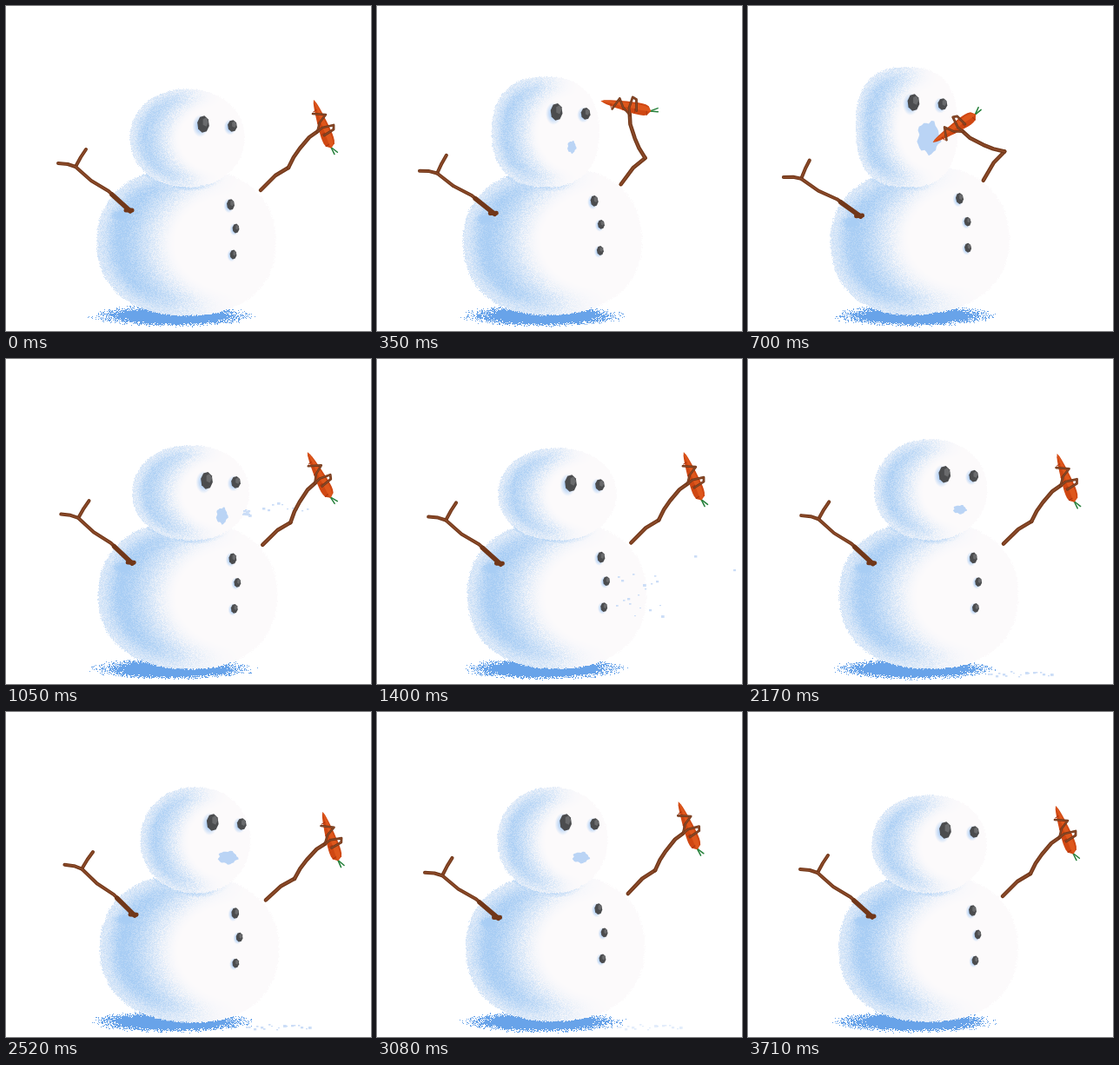
These frames come from a looping animation (420 by 374 pixels, 3.78 s). An HTML page with a canvas:

```html
<!DOCTYPE html>
<html lang="en">
<head>
<meta charset="utf-8">
<title>Snowman</title>
<style>
  html, body { margin: 0; width: 100%; height: 100%; overflow: hidden; background: #fff; }
  canvas { display: block; }
</style>
</head>
<body>
<canvas id="stage" width="420" height="374"></canvas>
<script>
const W = 420, H = 374, LOOP = 3780, STEP = 70;
const ctx = document.getElementById('stage').getContext('2d');
const image = ctx.createImageData(W, H);
const PIVOT = { x: 190, y: 355 };
const BODY = { x: 207, y: 271, rx: 103, ry: 85, n: 2.25 };
const NECK = 208, SNEEZE = 1000;

const clamp = v => Math.max(0, Math.min(1, v));
const smooth = (a, b, v) => { const k = clamp((v - a) / (b - a)); return k * k * (3 - 2 * k); };
// Eases up from a to b, holds, eases down from c to d
const pulse = (t, a, b, c, d) => smooth(a, b, t) * (1 - smooth(c, d, t));

function hash(x, y, seed) {
  let h = Math.imul(x + 101, 374761393) ^ Math.imul(y + 57, 668265263) ^ Math.imul(seed + 13, 2147477817);
  h = Math.imul(h ^ (h >>> 13), 1274126177);
  h = Math.imul(h ^ (h >>> 15), 2246822519);
  return ((h ^ (h >>> 16)) >>> 0) / 4294967296;
}

function poseAt(t) {
  const tickle = pulse(t, 100, 560, 910, 1080);
  const lean = -0.115 * tickle
    + 0.038 * pulse(t, 950, 1100, 1190, 1400)
    - 0.085 * pulse(t, 1360, 1640, 1650, 2120)
    + 0.042 * pulse(t, 2050, 2520, 2530, 2950)
    - 0.029 * pulse(t, 2750, 3080, 3360, 3710);
  const stretch = 25 * tickle
    - 7 * pulse(t, 960, 1080, 1400, 1560)
    + 20 * pulse(t, 1400, 1610, 1640, 1800)
    - 12 * pulse(t, 1640, 1820, 1830, 2200)
    + 9 * pulse(t, 2000, 2400, 3220, 3650);
  const gasp = pulse(t, 200, 560, 950, 1150), talk = pulse(t, 1600, 2520, 2900, 3650);
  const height = 113 + stretch;
  return {
    lean, bend: tickle,
    head: {
      x: 208 + 225 * lean, y: NECK - height / 2,
      rx: 66 - 0.3 * stretch, ry: height / 2,
      n: 2.1 + 0.5 * tickle
    },
    eyeX: 225 + 310 * lean + 1.5 * Math.cos(t / LOOP * 2 * Math.PI),
    eyeY: NECK - height + 41.5,
    mouthW: 28 * gasp + 24 * talk,
    mouthH: 40 * gasp + 16 * talk
  };
}

const radius = (u, v, n) => Math.pow(Math.pow(Math.abs(u), n) + Math.pow(Math.abs(v), n), 1 / n);

// Blue amount of a snowball lit from the right, at unit coordinates u, v
function shade(u, v, r) {
  const away = Math.hypot(u - 0.5, v - 0.02);
  return smooth(0.6, 1.3, away) * (1 - smooth(-0.2, 0.7, u)) * (1 - 0.6 * smooth(0.72, 1, r));
}

function paintSnow(pose, frame) {
  const px = image.data, { head } = pose;
  const cos = Math.cos(pose.lean), sin = Math.sin(pose.lean);
  px.fill(255);
  const put = (x, y, r, g, b) => {
    const i = (y * W + x) * 4;
    px[i] = r; px[i + 1] = g; px[i + 2] = b;
  };
  for (let y = 60; y < H; y++) {
    for (let x = 85; x < 335; x++) {
      const grain = hash(x, y, frame), ragged = (hash(x, y, frame + 99) - 0.5) * 0.025;
      const hu = (x - head.x) / head.rx, hv = (y - head.y) / head.ry;
      const hr = y < 225 ? radius(hu, hv, head.n) : 9;
      let blue = -1;
      if (hr + ragged < 1) {
        blue = 0.85 * shade(hu, hv, hr);
      } else {
        const dx = x - PIVOT.x, dy = y - PIVOT.y;
        const u = (dx * cos + dy * sin + PIVOT.x - BODY.x) / BODY.rx;
        const v = (dy * cos - dx * sin + PIVOT.y - BODY.y) / BODY.ry;
        const r = radius(u, v, BODY.n);
        if (r + ragged < 1) {
          blue = shade(u, v, r);
          if (hv > 0.5) blue = Math.max(blue, 0.7 * (1 - smooth(1, 1.14, hr)) * (1 - smooth(-0.1, 0.8, hu)));
          blue += 0.25 * (1 - smooth(0.3, 1, Math.hypot((u + 0.75) / 0.13, (v + 0.36) / 0.09)));
        }
      }
      if (blue >= 0) {
        const k = clamp(blue + (grain - 0.5) * 0.35 * smooth(0, 0.3, blue));
        put(x, y, 252 - 84 * k, 250 - 45 * k, 251 - 7 * k);
      } else if (y > 338) {
        const r = Math.hypot((x - 191) / 96, (y - 356) / 13);
        if (grain < 1 - smooth(0.55, 1.06, r)) put(x, y, 104, 163, 233);
      }
    }
  }
  ctx.putImageData(image, 0, 0);
}

function trace(points) {
  ctx.beginPath();
  points.forEach(([x, y], i) => i ? ctx.lineTo(x, y) : ctx.moveTo(x, y));
}

function line(points, color, width) {
  ctx.lineCap = ctx.lineJoin = 'round';
  trace(points);
  ctx.strokeStyle = color;
  ctx.lineWidth = width;
  ctx.stroke();
}

function twig(points, width) {
  line(points, '#713719', width);
  line(points, '#8b4a29', width * 0.45);
}

function fill(points, color) {
  trace(points);
  ctx.closePath();
  ctx.fillStyle = color;
  ctx.fill();
}

const ring = (count, point) => Array.from({ length: count }, (_, i) => point(i / count * Math.PI * 2));

function rock(x, y, w, h) {
  ctx.save();
  ctx.translate(x, y);
  ctx.scale(w / 2, h / 2);
  const glow = ctx.createRadialGradient(-0.5, 0.2, 0.4, -0.5, 0.2, 1.3);
  glow.addColorStop(0, 'rgba(160,198,243,.85)');
  glow.addColorStop(1, 'rgba(160,198,243,0)');
  ctx.fillStyle = glow;
  ctx.fillRect(-2, -2, 4, 4);
  fill(ring(8, a => [Math.cos(a + 0.2), Math.sin(a + 0.2)]), '#4b4c4e');
  fill(ring(5, a => [0.35 + 0.5 * Math.cos(a), -0.25 + 0.55 * Math.sin(a)]), '#6a6b6d');
  ctx.restore();
}

function mouth({ mouthW, mouthH, eyeX, eyeY }) {
  if (mouthW < 1) return;
  fill(ring(28, a => {
    const r = 0.46 + 0.045 * Math.sin(a * 5 + 1) + 0.035 * Math.sin(a * 9);
    return [eyeX + 18 + Math.cos(a) * r * mouthW, eyeY + 40 + Math.sin(a) * r * mouthH];
  }), '#bad4f5');
}

function leftArm() {
  twig([[80, 185], [86, 174], [92, 165]], 4);
  twig([[143, 236], [118, 213], [98, 201], [80, 185], [71, 182], [60, 181]], 4);
  line([[122, 217], [143, 236]], '#713719', 5.5);
  line([[138, 235], [145, 235]], '#713719', 5);
}

function carrot() {
  const length = 59;
  const halfWidth = u => 8.6 * Math.pow(u, 0.6) * Math.sqrt(1 - Math.pow(u, 8));
  const side = (sign, scale) => Array.from({ length: 17 }, (_, i) => [i / 16 * length, sign * scale * halfWidth(i / 16)]);
  ctx.save();
  ctx.translate(354, 108);
  ctx.rotate(1.22);
  line([[58, 0], [67, -1]], '#25803a', 1.5);
  line([[58, 0], [66, -5]], '#25803a', 1.5);
  fill([...side(1, 1), ...side(-1, 1).reverse()], '#cf4712');
  fill([...side(-1, 0.7), ...side(1, 0.15).reverse()], '#de571c');
  for (let x = 12; x < 55; x += 14) line([[x, 1], [x + 1, 5]], '#a93510', 1);
  ctx.restore();
}

function rightArm(bend) {
  ctx.save();
  ctx.translate(293 - 5 * bend, 212 - bend);
  ctx.rotate(-0.14 * bend);
  twig([[0, 0], [17, -17], [32, -26]], 4.5);
  ctx.translate(32, -26);
  ctx.rotate(-1.545 * bend);
  twig([[0, 0], [6, -12], [13, -22], [24, -35], [34, -42]], 4.5);
  ctx.translate(-325, -186);
  carrot();
  twig([[358, 145], [361, 134], [368, 125], [353, 124]], 2.6);
  twig([[358, 145], [364, 140], [377, 137], [377, 142], [366, 149]], 2.8);
  ctx.restore();
}

// Snow thrown out by the sneeze; slow bits stay on the ground for a while
function spray(t) {
  if (t < SNEEZE) return;
  const s = (t - SNEEZE) / 1000, count = 28;
  ctx.globalAlpha = 1 - smooth(2600, 3600, t);
  ctx.fillStyle = '#cbddf7';
  for (let i = 0; i < count; i++) {
    const along = (i + 0.5) / count, fast = i % 3 === 0;
    const a = hash(i, 2, 5), b = hash(i, 3, 5), size = 1 + 2 * hash(i, 4, 5);
    const floor = 359 + 6 * b;
    const fall = 172 + (fast ? 200 * a - 180 : 130 * a) * s + 460 * s * s;
    const x = fast ? 285 + (180 + 1050 * along) * s : 272 + 80 * along * clamp(s / 0.55);
    if (fast && fall > floor) continue;
    ctx.fillRect(Math.round(x), Math.round(Math.min(fall, floor)), size + 0.8, size);
  }
  ctx.globalAlpha = 1;
}

function draw(t) {
  const pose = poseAt(t);
  const withLean = paint => {
    ctx.save();
    ctx.translate(PIVOT.x, PIVOT.y);
    ctx.rotate(pose.lean);
    ctx.translate(-PIVOT.x, -PIVOT.y);
    paint();
    ctx.restore();
  };
  paintSnow(pose, t / STEP);
  spray(t);
  withLean(() => {
    leftArm();
    rock(258.5, 228.5, 9, 13);
    rock(264.5, 256, 8, 11);
    rock(261.5, 286, 8, 11);
  });
  mouth(pose);
  rock(pose.eyeX + 0.5, pose.eyeY - 0.5, 14, 20);
  rock(pose.eyeX + 34, pose.eyeY + 1.5, 11, 14);
  withLean(() => rightArm(pose.bend));
}

let shown = -1;
function tick() {
  const t = Math.floor(performance.now() % LOOP / STEP) * STEP;
  if (t !== shown) draw(shown = t);
  requestAnimationFrame(tick);
}
tick();
</script>
</body>
</html>
```
